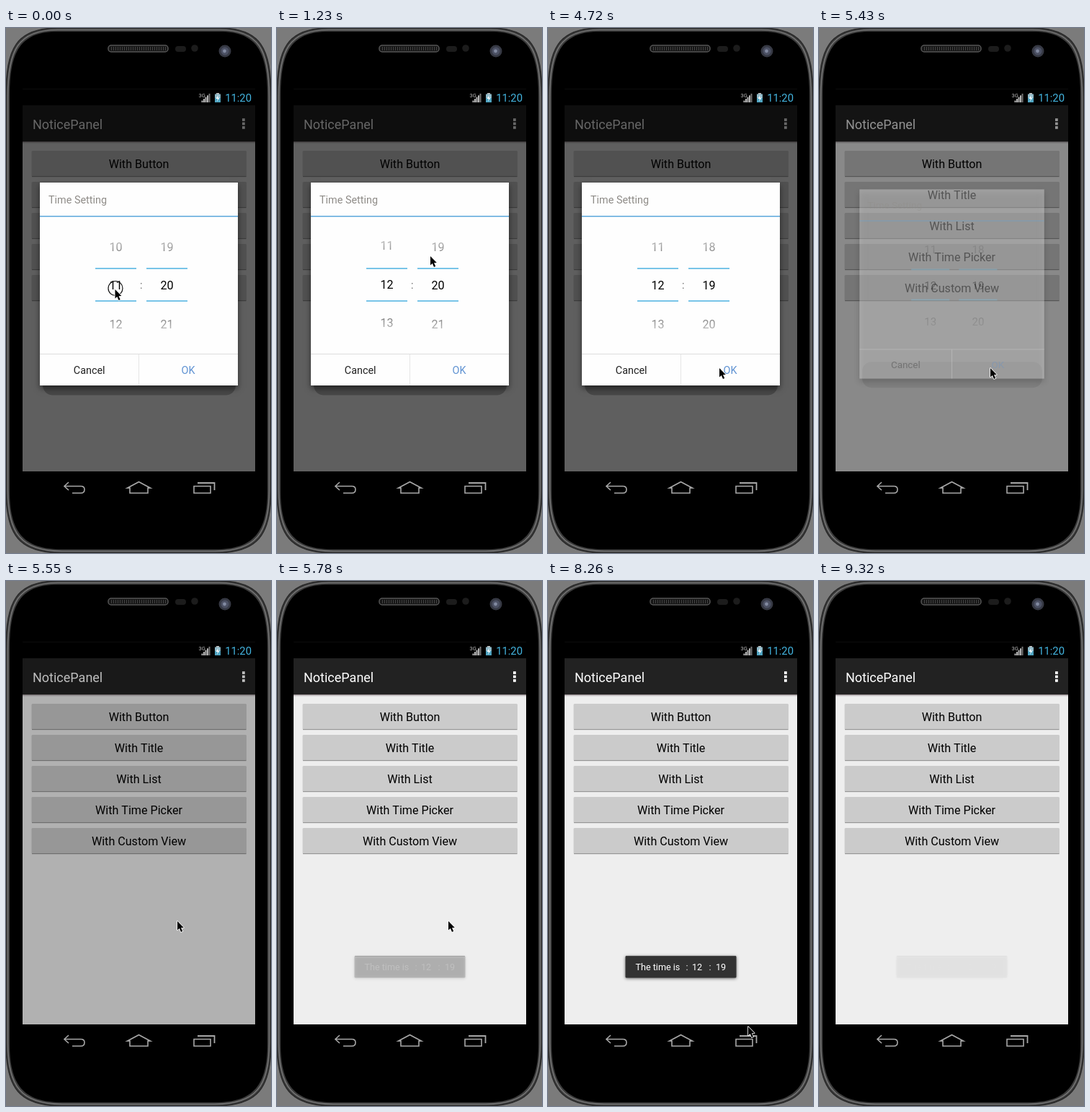
Recreate the animation shown at these times as an HTML page with a canvas. Size 368 by 727 pixels, loop 9.7 s.

```html
<!DOCTYPE html>
<html lang="en">
<head>
<meta charset="utf-8">
<title>Time picker dialog</title>
<style>
html, body { margin: 0; width: 100%; height: 100%; overflow: hidden; background: #777; }
canvas { display: block; width: 368px; height: 727px; }
</style>
</head>
<body>
<canvas id="stage"></canvas>
<script>
const W = 368, H = 727, LOOP = 9700;
const FONT = 'Roboto, "Noto Sans", sans-serif';
const canvas = document.getElementById('stage');
const ctx = canvas.getContext('2d');
const dpr = window.devicePixelRatio || 1;
canvas.width = W * dpr;
canvas.height = H * dpr;

const clamp = (v, lo = 0, hi = 1) => Math.min(hi, Math.max(lo, v));
const part = (t, a, b) => clamp((t - a) / (b - a));
const lerp = (a, b, k) => a + (b - a) * k;
const smooth = k => k * k * (3 - 2 * k);
const easeOut = (k, p) => 1 - Math.pow(1 - k, p);

// Each key is [time, value, value, ...]; values ease between keys.
function track(keys, t) {
  let i = 0;
  while (i < keys.length - 2 && t >= keys[i + 1][0]) i++;
  const a = keys[i], b = keys[i + 1];
  const k = smooth(part(t, a[0], b[0]));
  return a.slice(1).map((v, j) => lerp(v, b[j + 1], k));
}

const CURSOR = [
  [60, 151.5, 362], [960, 153, 281], [1050, 153, 281], [1230, 213, 316],
  [1480, 222, 304], [1940, 212, 288], [2240, 212, 288], [2480, 228, 437],
  [2780, 228, 437], [2920, 238, 328], [3010, 238, 348], [3190, 238, 348],
  [3250, 238, 356], [4180, 238, 385], [4240, 238, 387], [4720, 238, 471],
  [6250, 238, 471], [6610, 89, 550], [6680, 85, 553], [7190, 249, 562],
  [7250, 250, 563], [7970, 251, 563], [8730, 333, 728]
];
const HOUR = [[60, 0], [960, 66]];
const MINUTE = [[2920, 0], [3010, -12], [3190, -12], [3250, -19.5], [4180, -49]];

function rect(x, y, w, h, fill) {
  ctx.fillStyle = fill;
  ctx.fillRect(x, y, w, h);
}

function pill(x, y, w, h, r, fill, stroke) {
  ctx.beginPath();
  ctx.roundRect(x, y, w, h, r);
  if (fill) { ctx.fillStyle = fill; ctx.fill(); }
  if (stroke) { ctx.strokeStyle = stroke; ctx.stroke(); }
}

function disc(x, y, r, fill) {
  ctx.beginPath();
  ctx.arc(x, y, r, 0, 7);
  ctx.fillStyle = fill;
  ctx.fill();
}

function text(str, x, y, size, fill, align = 'left') {
  ctx.font = `${size}px ${FONT}`;
  ctx.textAlign = align;
  ctx.fillStyle = fill;
  ctx.fillText(str, x, y);
}

function lines(points, stroke, width, closed) {
  ctx.beginPath();
  points.forEach(([x, y]) => ctx.lineTo(x, y));
  if (closed) ctx.closePath();
  ctx.strokeStyle = stroke;
  ctx.lineWidth = width;
  ctx.stroke();
}

function shell(d, fill, stroke, width) {
  const l = d, r = W - d, b = H - d;
  ctx.beginPath();
  ctx.moveTo(l, 95);
  ctx.bezierCurveTo(l, 28 + d, 14 + d, d, 72, d);
  ctx.lineTo(W - 72, d);
  ctx.bezierCurveTo(r - 14, d, r, 28 + d, r, 95);
  ctx.lineTo(r, 640);
  ctx.bezierCurveTo(r, 702 - d, r - 18, b, W - 78, b);
  ctx.lineTo(78, b);
  ctx.bezierCurveTo(18 + d, b, l, 702 - d, l, 640);
  ctx.closePath();
  if (fill) { ctx.fillStyle = fill; ctx.fill(); }
  if (stroke) { ctx.strokeStyle = stroke; ctx.lineWidth = width; ctx.stroke(); }
}

function phone() {
  rect(0, 0, W, H, '#7b7b7b');
  shell(0, '#3c3c3c', '#2a2a2a', 1.5);
  shell(2.5, null, '#747474', 1.6);
  shell(5, '#000');

  ctx.lineWidth = 1.5;
  pill(142, 24, 83, 9, 4, '#161616', '#555');
  for (let x = 146; x < 223; x += 3) rect(x, 26, 1, 5, '#444');
  pill(235, 25, 15, 8, 4, '#1c1c1c');
  disc(262, 28, 4.8, '#1c1c1c');
  disc(304, 32, 8.5, '#363944');
  disc(304, 32, 5.5, '#4c5164');
  disc(303.5, 32, 2.4, '#8189a0');
  rect(23, 84, 323, 1, '#0c0c0c');

  const grey = '#a8a8a8';
  ctx.lineJoin = 'miter';
  lines([[87, 629], [81, 634.5], [87, 640]], grey, 1.6);
  ctx.beginPath();
  ctx.moveTo(81, 634.5);
  ctx.lineTo(104, 634.5);
  ctx.quadraticCurveTo(109, 634.5, 109, 639);
  ctx.quadraticCurveTo(109, 644, 104, 644);
  ctx.lineTo(92, 644);
  ctx.stroke();
  lines([[184.5, 628.5], [200.5, 637], [197, 637], [197, 644], [172, 644],
    [172, 637], [168.5, 637]], grey, 1.6, true);
  lines([[261, 634.5], [284, 634.5], [284, 644], [261, 644]], grey, 1.6, true);
  lines([[266, 630], [289.5, 630], [289.5, 640]], grey, 1.8);
}

function statusBar() {
  text('3G', 267.5, 96, 7.5, '#bbb');
  for (let i = 0; i < 5; i++) {
    const h = 2.5 + i * 2.4;
    rect(271.5 + i * 2.5, 103 - h, 2, h, i < 4 ? '#b5b5b5' : '#777');
  }
  rect(292, 90, 4, 2, '#bbb');
  rect(290, 91.5, 8, 11.5, '#8fb9c8');
  rect(290, 97, 8, 6, '#4fa3c0');
  ctx.beginPath();
  [[295, 92.5], [291.5, 98], [294, 98], [293, 102], [296.5, 96.5], [294, 96.5]]
    .forEach(([x, y]) => ctx.lineTo(x, y));
  ctx.fillStyle = '#fff';
  ctx.fill();
  text('11:20', 341, 102, 14.8, '#43b4df', 'right');
}

function page() {
  rect(23, 107, 323, 507, '#eee');
  rect(23, 107, 323, 50, '#222');
  rect(23, 157, 323, 1, '#8c8487');
  rect(23, 158, 323, 1, '#c9c4c6');
  rect(23, 159, 323, 1, '#dedcdd');
  text('NoticePanel', 37, 139.5, 18, '#fff');
  for (let i = 0; i < 3; i++) rect(328, 125.2 + i * 5.4, 3.8, 3.8, '#fff');
  ['Button', 'Title', 'List', 'Time Picker', 'Custom View'].forEach((name, i) => {
    const y = 170 + i * 43;
    pill(35.5, y, 298.5, 36, 1.5, '#cbcbcb');
    rect(36, y + 35, 297.5, 1.2, '#969696');
    text('With ' + name, 184.5, y + 24, 16.1, '#000', 'center');
  });
}

// Numbers fade towards the top and bottom of the wheel.
function wheel(x, value, shift) {
  const mid = 356.5, pitch = 53.5, half = 80.5;
  ctx.save();
  ctx.beginPath();
  ctx.rect(x - 28, mid - half, 56, half * 2);
  ctx.clip();
  const ink = ctx.createLinearGradient(0, mid - half, 0, mid + half);
  ink.addColorStop(0, 'rgba(0,0,0,0)');
  ink.addColorStop(0.447, '#000');
  ink.addColorStop(0.553, '#000');
  ink.addColorStop(1, 'rgba(0,0,0,0)');
  for (let i = -3; i <= 3; i++) {
    text(value + i, x, mid + i * pitch - shift + 5.7, 16.1, ink, 'center');
  }
  ctx.restore();
  rect(x - 28.5, 332, 57, 2, '#78c4e8');
  rect(x - 28.5, 377, 57, 2, '#78c4e8');
}

function dialog(t) {
  const out = part(t, 5310, 5490);
  if (out === 1) return;
  ctx.save();
  ctx.globalAlpha = 1 - out;
  const s = 1 - 0.1 * out;
  ctx.translate(184.5, 354.5);
  ctx.scale(s, s);
  ctx.translate(-184.5, -354.5);

  pill(51, 470, 268, 38.5, 14, 'rgba(0,0,0,0.25)');
  ctx.save();
  ctx.shadowColor = 'rgba(0,0,0,0.5)';
  ctx.shadowBlur = 8 * dpr;
  ctx.shadowOffsetY = 4 * dpr;
  rect(47, 214, 275, 281, '#fefefe');
  ctx.restore();

  text('Time Setting', 59, 243, 14.4, '#8e8b87');
  rect(47, 260, 275, 1.5, '#5ba7dc');
  const hour = t < 960 ? track(HOUR, t)[0]
    : lerp(66, 53.5, easeOut(part(t, 960, 1700), 5));
  const minute = t < 4180 ? track(MINUTE, t)[0]
    : lerp(-49, -53.5, easeOut(part(t, 4180, 4720), 3));
  wheel(152.5, 11, hour);
  wheel(223.5, 20, minute);
  text(':', 187.8, 361, 14.4, '#666', 'center');

  rect(47, 451, 275, 1, '#dedede');
  rect(184, 452, 1, 43, '#e6e6e6');
  text('Cancel', 115.7, 479, 14.4, '#222', 'center');
  text('OK', 253, 479, 14.4, '#5f92d2', 'center');
  ctx.restore();
}

function toast(t) {
  const alpha = t < 8910 ? part(t, 5700, 6070) : lerp(1, 0.04, part(t, 8910, 9320));
  if (!alpha) return;
  ctx.save();
  ctx.globalAlpha = alpha;
  ctx.save();
  ctx.shadowColor = 'rgba(0,0,0,0.55)';
  ctx.shadowBlur = 4 * dpr;
  ctx.shadowOffsetY = dpr;
  pill(107.5, 519, 154, 30.5, 1.5, '#323232');
  ctx.restore();
  rect(108, 519, 153, 1, '#4a4a4a');
  [['The time is', 121.5], [':', 191.5], ['12', 200], [':', 223.5], ['19', 233]]
    .forEach(([s, x]) => text(s, x, 539, 12.6, '#fff'));
  ctx.restore();
}

function cursor(t) {
  if (t >= 8730) return;
  const [x, y] = track(CURSOR, t);
  if (t < 990 || (t >= 2920 && t < 4240)) {
    ctx.beginPath();
    ctx.arc(x + 0.5, y - 1.5, 10, 0, 7);
    ctx.strokeStyle = '#111';
    ctx.lineWidth = 1.2;
    ctx.stroke();
  }
  ctx.beginPath();
  [[0, 0], [0, 12.5], [2.8, 10], [5, 15], [7.2, 14], [5, 9.2], [8.8, 9]]
    .forEach(([dx, dy]) => ctx.lineTo(x + dx, y + dy));
  ctx.closePath();
  ctx.lineJoin = 'round';
  ctx.strokeStyle = '#fff';
  ctx.lineWidth = 1.6;
  ctx.stroke();
  ctx.fillStyle = '#000';
  ctx.fill();
}

function draw(t) {
  ctx.setTransform(dpr, 0, 0, dpr, 0, 0);
  phone();
  statusBar();
  page();
  const dim = 0.6 * (1 - part(t, 5310, 5735));
  rect(23, 107, 323, 507, `rgba(0,0,0,${dim})`);
  dialog(t);
  toast(t);
  cursor(t);
}

const start = performance.now();
function tick() {
  draw((performance.now() - start) % LOOP);
  requestAnimationFrame(tick);
}
tick();
</script>
</body>
</html>
```
